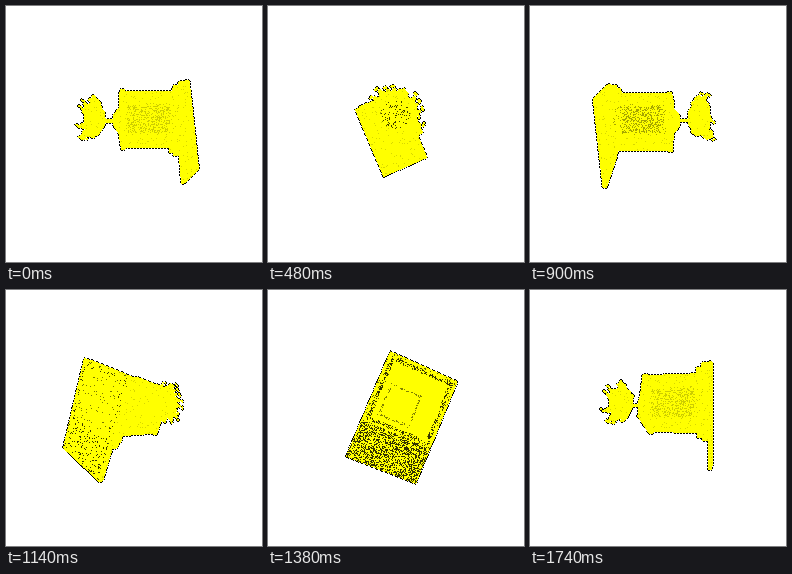
These frames come from a looping animation (256x256 px, 1.8 s). An HTML page with a canvas:

```html
<!DOCTYPE html>
<html>
<head>
<meta charset="utf-8">
<title>Turning object</title>
<style>
  html, body { margin: 0; width: 100%; height: 100%; overflow: hidden; background: #fff; }
  canvas { display: block; width: 100vw; height: 100vh; image-rendering: pixelated; }
</style>
</head>
<body>
<canvas id="stage" width="256" height="256"></canvas>
<script>
const SIZE = 256, MID = 128, STEPS = 30, STEP_MS = 60;
const DIST = 235;                       // camera distance
const ROLL = 22.7 * Math.PI / 180;      // roll about the long axis
const CR = Math.cos(ROLL), SR = Math.sin(ROLL);
const AXIS = -14.5;                     // body axis, measured along the plate
const FACE = 53;                        // outer face of the plate
const PLATE_W = 29.2, PLATE_H = 43.7;   // half sizes of the plate

const out = document.getElementById('stage').getContext('2d');
const shape = document.createElement('canvas');
shape.width = shape.height = SIZE;
const ctx = shape.getContext('2d', { willReadFrequently: true });

let cos = 1, sin = 0;

function hash(x, y) {
  const v = Math.sin(x * 12.9898 + y * 78.233) * 43758.5453;
  return v - Math.floor(v);
}

// a: along the long axis, w: sideways, y: down
function project(a, w, y) {
  const k = DIST / (DIST + a * sin + w * cos);
  return [MID + (a * cos - w * sin) * k, MID + y * k, k];
}

// p, q: plate directions before the roll
function local(a, p, q) {
  return project(a, p * CR - q * SR, p * SR + q * CR);
}

function hull(points) {
  const pts = points.slice().sort((m, n) => m[0] - n[0] || m[1] - n[1]);
  const half = list => {
    const h = [];
    for (const c of list) {
      while (h.length > 1) {
        const [m, n] = h.slice(-2);
        if ((n[0] - m[0]) * (c[1] - m[1]) - (n[1] - m[1]) * (c[0] - m[0]) > 0) break;
        h.pop();
      }
      h.push(c);
    }
    return h.slice(0, -1);
  };
  return half(pts).concat(half(pts.reverse()));
}

function trace(pts) {
  ctx.beginPath();
  pts.forEach(([x, y]) => ctx.lineTo(x, y));
  ctx.closePath();
}

function solid(pts) {
  trace(hull(pts));
  ctx.fill();
}

const square = (a, s, q0 = AXIS - s, q1 = AXIS + s) =>
  [local(a, -s, q0), local(a, s, q0), local(a, s, q1), local(a, -s, q1)];

const prism = (a0, a1, s, q0, q1) =>
  solid(square(a0, s, q0, q1).concat(square(a1, s, q0, q1)));

const polar = (a, r, t) => local(a, r * Math.cos(t) - 1, AXIS - 2 + r * Math.sin(t));

const ring = (a, r, count = 16) =>
  Array.from({ length: count }, (_, i) => polar(a, r, i / count * 2 * Math.PI));

function ball(a, r, t, size) {
  const [x, y, k] = polar(a, r, t);
  ctx.beginPath();
  ctx.arc(x, y, size * k, 0, 7);
  ctx.fill();
}

function drawKnob() {
  solid([...ring(-30, 7), ...ring(-37, 18), ...ring(-48, 15)]);
  const count = 22;
  for (let i = 0; i < count; i++) {
    const t = i / count * 2 * Math.PI;
    const a = -37 - 16 * hash(i, 3);
    const r = 20.5 + 5 * hash(i, 8);
    ball(a + 2, r - 6, t, 3);
    ball(a, r - 3, t + .04, 1.7);
    ball(a - 1, r, t + .08, 1.2);
    ball(a - 3, r - .5, t + .15, 1.1);
  }
}

// Red holds the chance of a speck, green its brightness.
const grain = (d, tone) => {
  ctx.fillStyle = ctx.strokeStyle = `rgb(${Math.round(d * 255)},${tone},0)`;
};

function speckle(pts, d, tone) {
  grain(d, tone);
  trace(pts);
  ctx.fill();
}

function drawGrain() {
  const facing = (-DIST * sin - FACE) / (DIST - FACE);
  if (facing > .05) {
    const d = facing ** 5;
    speckle(square(FACE, PLATE_W, -PLATE_H, PLATE_H), .08 * facing, 90);
    speckle(square(FACE, PLATE_W, 13.5, PLATE_H), .06 + .34 * d, 50);
    speckle(square(FACE, 26.5), .06 + .34 * d, 50);
    speckle(square(FACE, 23.5), .04 * (1 - d), 120);
    if (facing > .85) {
      grain(.35, 130);
      ctx.lineWidth = 2;
      trace(square(-13, 17));
      ctx.stroke();
    }
  }
  if (Math.abs(cos) > .85) {
    const side = (a0, a1, y0, y1) =>
      [project(a0, 0, y0), project(a1, 0, y0), project(a1, 0, y1), project(a0, 0, y1)];
    const tone = cos < 0 ? 165 : 205;
    speckle(side(-8, 45, -31, 1), .1, tone);
    speckle(side(-6, 36, -28, -1), .32, tone);
  }
  if (sin > .4) speckle(ring(-48, 12), .12, 60);
}

function drawShape() {
  ctx.clearRect(0, 0, SIZE, SIZE);
  ctx.globalCompositeOperation = 'source-over';
  ctx.fillStyle = '#000';
  prism(49, FACE, PLATE_W, -PLATE_H, PLATE_H);
  prism(43, FACE, 28.8);              // base
  prism(38, 43, 26);
  prism(-13, 38, 22);                 // body
  prism(-14, -9, 23);
  solid([...square(-14, 11), ...square(-21, 5)]);
  prism(-32, -20, 1.2);               // neck
  drawKnob();
  ctx.globalCompositeOperation = 'source-atop';
  grain(.03, 215);
  ctx.fillRect(0, 0, SIZE, SIZE);
  drawGrain();
}

// Yellow inside, broken black line just outside.
function paint() {
  const src = ctx.getImageData(0, 0, SIZE, SIZE).data;
  const img = out.createImageData(SIZE, SIZE);
  const inside = i => src[i * 4 + 3] > 127;
  for (let i = 0; i < SIZE * SIZE; i++) {
    const x = i % SIZE, y = (i - x) / SIZE;
    let c = [255, 255, 255];
    if (inside(i)) {
      const tone = hash(x, y) * 255 < src[i * 4] ? src[i * 4 + 1] : 255;
      c = [tone, tone, 0];
    } else if (inside(i - 1) || inside(i + 1) || inside(i - SIZE) || inside(i + SIZE)) {
      if ((x + 2 * y) % 3) c = [0, 0, 0];
    }
    img.data.set([...c, 255], i * 4);
  }
  out.putImageData(img, 0, 0);
}

let shown = -1;
function tick() {
  const step = Math.floor(performance.now() / STEP_MS) % STEPS;
  if (step !== shown) {
    shown = step;
    const turn = step / STEPS * 2 * Math.PI;
    cos = Math.cos(turn);
    sin = Math.sin(turn);
    drawShape();
    paint();
  }
  requestAnimationFrame(tick);
}
tick();
</script>
</body>
</html>
```
